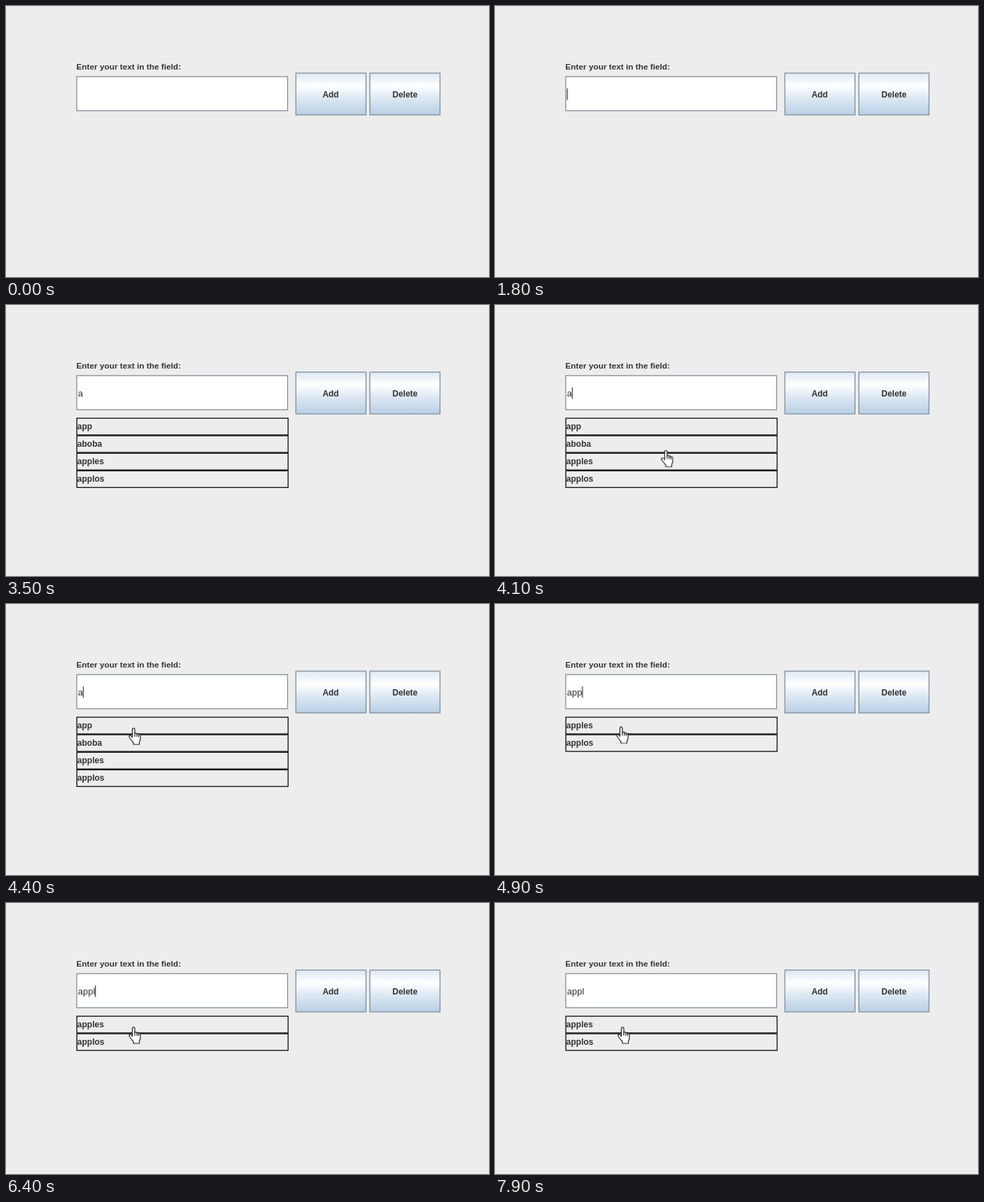
Animation, 690 px wide and 388 px high, one loop 8 s. Source, as an HTML page:

```html
<!DOCTYPE html>
<html lang="en">
<head>
<meta charset="utf-8">
<title>Text suggestions</title>
<style>
  html, body { margin: 0; width: 100%; height: 100%; overflow: hidden; background: #ededed; }
  svg { display: block; width: 690px; height: 388px; }
  text { font: bold 12px "Liberation Sans", Arial, sans-serif; fill: #333; }
  .label { font-size: 11.8px; }
  .typed text { font-weight: normal; font-size: 13px; }
  .mid { text-anchor: middle; }
  .edge { stroke: #7a8a99; stroke-width: 1.25; }
  .row rect { fill: none; stroke: #000; stroke-width: 1.25; }

  .anim { animation: 8s step-end -20ms infinite; }
  .a { animation-name: a; }
  .app { animation-name: app; }
  .appl { animation-name: appl; }
  .all { animation-name: a; }
  .few { animation-name: few; }
  .caret { fill: #333; animation-name: blink; }
  .spot { animation-name: spot; }
  .hand { animation-name: hand; animation-timing-function: linear; }
  .shown { animation-name: shown; }

  @keyframes a { 0%, 61.25% { visibility: hidden; } 25% { visibility: visible; } }
  @keyframes app { 0%, 67.5% { visibility: hidden; } 61.25% { visibility: visible; } }
  @keyframes appl { 0% { visibility: hidden; } 67.5%, 100% { visibility: visible; } }
  @keyframes few { 0% { visibility: hidden; } 61.25%, 100% { visibility: visible; } }
  @keyframes shown { 0% { visibility: hidden; } 48.75%, 100% { visibility: visible; } }
  @keyframes blink {
    0%, 31.25%, 43.75%, 56.25%, 73.75%, 86.25%, 98.75%, 100% { visibility: hidden; }
    20%, 37.5%, 50%, 61.25%, 80%, 92.5% { visibility: visible; }
  }
  @keyframes spot {
    0% { transform: translateX(102.6px); }
    25% { transform: translateX(109.8px); }
    61.25% { transform: translateX(124.3px); }
    67.5%, 100% { transform: translateX(127.1px); }
  }
  @keyframes hand {
    0%, 48.75% { transform: translate(412px, 294px); animation-timing-function: ease-out; }
    53.75%, 56.25% { transform: translate(175px, 177px); }
    58.75%, 66.25% { transform: translate(173px, 175.5px); }
    67.5%, 100% { transform: translate(175px, 177px); }
  }
</style>
</head>
<body>
<svg viewBox="0 0 690 388">
  <defs>
    <linearGradient id="steel" x2="0" y2="1">
      <stop offset="0" stop-color="#dde8f3"/>
      <stop offset=".3" stop-color="#fff"/>
      <stop offset=".6" stop-color="#dde8f3"/>
      <stop offset="1" stop-color="#b8cfe5"/>
    </linearGradient>
  </defs>

  <text class="label" x="100.5" y="91">Enter your text in the field:</text>
  <rect class="edge" x="101.1" y="101.1" width="301.2" height="48.8" fill="#fff"/>

  <g fill="url(#steel)">
    <rect class="edge" x="414.1" y="96.1" width="100.2" height="59.8"/>
    <rect class="edge" x="519.8" y="96.1" width="100.2" height="59.8"/>
  </g>
  <text class="mid" x="463.8" y="131">Add</text>
  <text class="mid" x="570" y="131">Delete</text>

  <g class="typed">
    <text class="anim a" x="102.8" y="131">a</text>
    <text class="anim app" x="102.8" y="131">app</text>
    <text class="anim appl" x="102.8" y="131">appl</text>
  </g>
  <g class="anim spot"><rect class="anim caret" y="118" width="1.2" height="16.5"/></g>

  <g class="anim all" data-words="app aboba apples applos"></g>
  <g class="anim few" data-words="apples applos"></g>

  <g class="anim shown">
    <g class="anim hand" stroke="#222" stroke-width="1.2" stroke-linejoin="round" stroke-linecap="round">
      <path fill="#fff" d="M5.5 2.5Q5.5 .8 7.2 .8Q9 .8 9 2.5V8.2Q11.6 7.2 12 9Q14 8.2 14.4 10Q17 9.2 17 12V16.5Q17 18.5 15.5 20.5V24H7V21.5Q4.5 18.5 1.5 14.5Q.3 12.2 1.6 11.6Q3.2 11 5.5 14Z"/>
      <path fill="none" d="M9 8.2V12.5M12 9V12.5M14.4 10V13"/>
    </g>
  </g>
</svg>
<script>
  // Fill each list with bordered rows
  const rowHeight = 25.1;
  for (const list of document.querySelectorAll("[data-words]")) {
    list.innerHTML = list.dataset.words.split(" ").map((word, i) =>
      `<g class="row" transform="translate(0 ${161.5 + i * rowHeight})">
        <rect x="101.2" y=".6" width="301.8" height="${rowHeight - 1.25}"/>
        <text x="101.8" y="16.7">${word}</text>
      </g>`).join("");
  }
</script>
</body>
</html>
```
